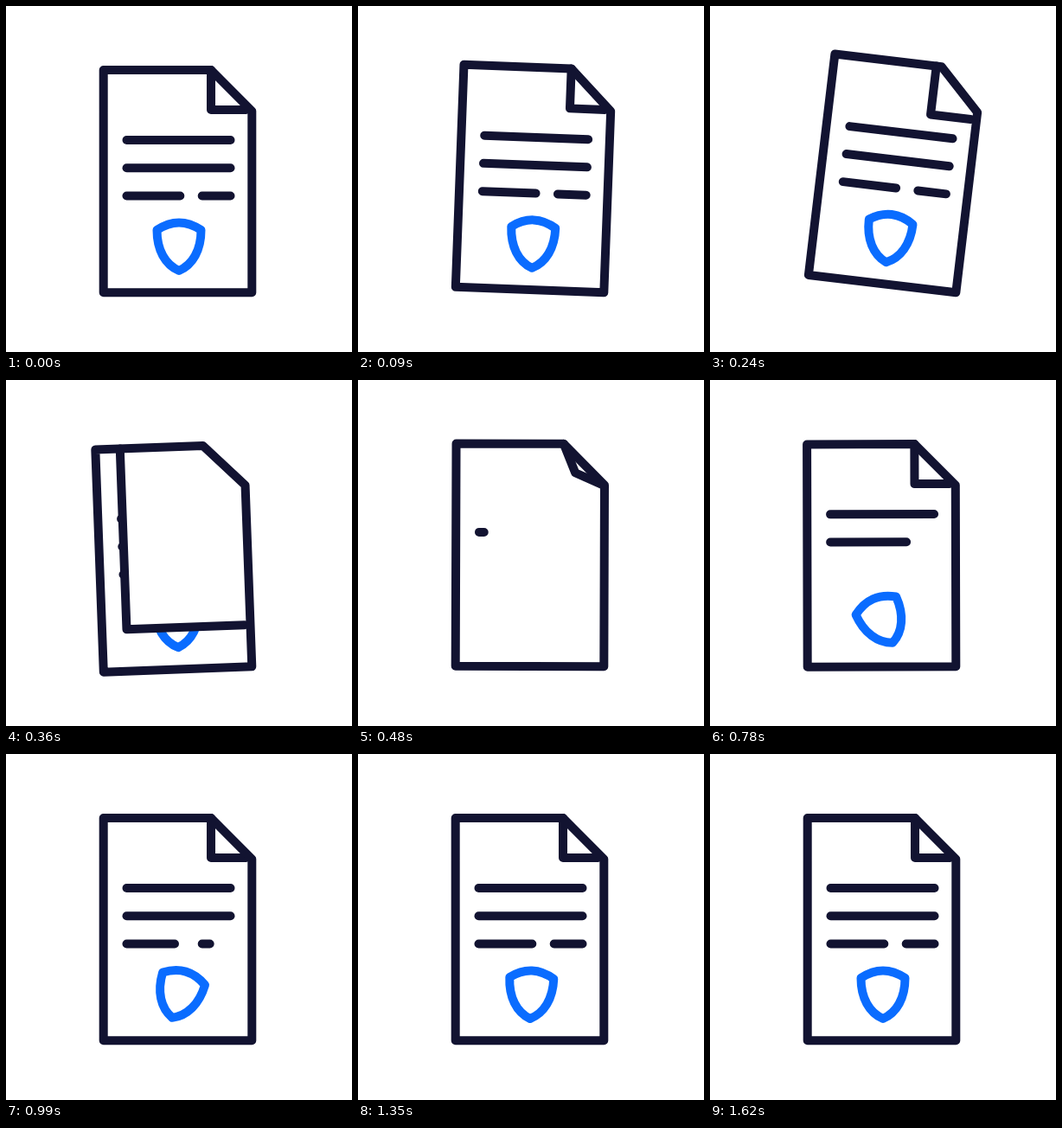
Write an HTML page that moves like this. It is 400 by 400 pixels and loops after 1.71 s.

```html
<!DOCTYPE html>
<html lang="en">
<head>
<meta charset="utf-8">
<title>Secured document</title>
<style>
  html, body { margin: 0; width: 100%; height: 100%; overflow: hidden; background: #fff; }
  svg { display: block; width: 100vw; height: 100vh; }
  path { fill: none; stroke: #121331; stroke-width: 10; stroke-linecap: round; stroke-linejoin: round; }
  #flap { fill: #fff; stroke: none; }
  #shield { stroke: #0a6cff; }
</style>
</head>
<body>
<svg viewBox="0 0 400 400">
  <g id="page">
    <g id="content">
      <path class="line"/><path class="line"/><path class="line"/><path class="line"/>
      <path id="shield" d="M174.5 259C182 254 190.500 250.500 200 250.500S218 254 225.500 259C225.500 282 216 299 200 306C184 299 174.500 282 174.500 259Z"/>
    </g>
    <path id="flap"/>
    <path id="fold"/>
    <path d="M112.700 74H237L284.300 121.500V331.300H112.700Z"/>
  </g>
</svg>
<script>
const LOOP = 1710, STEP = 30, LAST = 1620, TURNED = 428;

// [time, value] keys, eased between neighbours
const TILT = [[0, 0], [240, 6.8], [390, -3.15], [540, 2], [690, -0.4], [840, 0]];
const SWING = [[510, 0], [720, -32], [960, 18], [1170, -9], [1380, 3], [1560, 0]];
const GROW = [[510, 0], [720, 1]];
const RISE = [[450, 22], [750, 0]];
const TURN = [[211, 0], [427, 1]];
const CREASE = [[430, 0], [540, 1]];

// left, right, y, start of drawing
const LINES = [
  [139.5, 259.5, 155, 450],
  [139.5, 259.5, 187.2, 630],
  [139.5, 201.3, 219.5, 808],
  [226.7, 259.5, 219.5, 912]
];
const DRAW = 227;

const $ = id => document.getElementById(id);
const page = $('page'), content = $('content'), shield = $('shield');
const flap = $('flap'), fold = $('fold');
const lines = document.querySelectorAll('.line');

const mix = (a, b, p) => a + (b - a) * p;
const ease = u => u * u * (3 - 2 * u);

function at(keys, t) {
  if (t <= keys[0][0]) return keys[0][1];
  for (let i = 1; i < keys.length; i++) {
    const [t0, a] = keys[i - 1], [t1, b] = keys[i];
    if (t < t1) return mix(a, b, ease((t - t0) / (t1 - t0)));
  }
  return keys[keys.length - 1][1];
}

function drawFold(t) {
  if (t < TURNED) {
    const p = at(TURN, t);
    const x = mix(237, 112.7, p), y = mix(120, 331.3, p);
    flap.setAttribute('d', `M${x} 74V${y}H284.3V121.5L237 74Z`);
    fold.setAttribute('d', `M${x} 74V${y}H277.5`);
  } else {
    const p = at(CREASE, t);
    const x = mix(260.6, 237, p), y = mix(97.7, 120, p);
    const d = `M237 74L${x} ${y}L${mix(284.3, 277.5, p)} ${mix(121.5, 120, p)}`;
    flap.setAttribute('d', d + 'L284.3 121.5Z');
    fold.setAttribute('d', d);
  }
}

function render(t) {
  const fresh = t >= TURNED;
  page.setAttribute('transform', `rotate(${at(TILT, t)} 284.3 331.3)`);
  content.setAttribute('transform', `translate(0 ${fresh ? at(RISE, t) : 0})`);

  LINES.forEach(([x0, x1, y, start], i) => {
    const p = fresh ? at([[start, 0], [start + DRAW, 1]], t) : 1;
    lines[i].setAttribute('d', p > 0 ? `M${x0} ${y}H${mix(x0, x1, p)}` : '');
  });

  const size = fresh ? at(GROW, t) : 1;
  shield.style.display = size > 0 ? '' : 'none';
  shield.setAttribute('transform',
    `translate(200 278.5) rotate(${at(SWING, t)}) scale(${size}) translate(-200 -278.5)`);

  drawFold(t);
}

const begin = performance.now();
function tick() {
  const t = (performance.now() - begin) % LOOP;
  render(Math.min(LAST, Math.floor(t / STEP) * STEP));
  requestAnimationFrame(tick);
}
tick();
</script>
</body>
</html>
```
